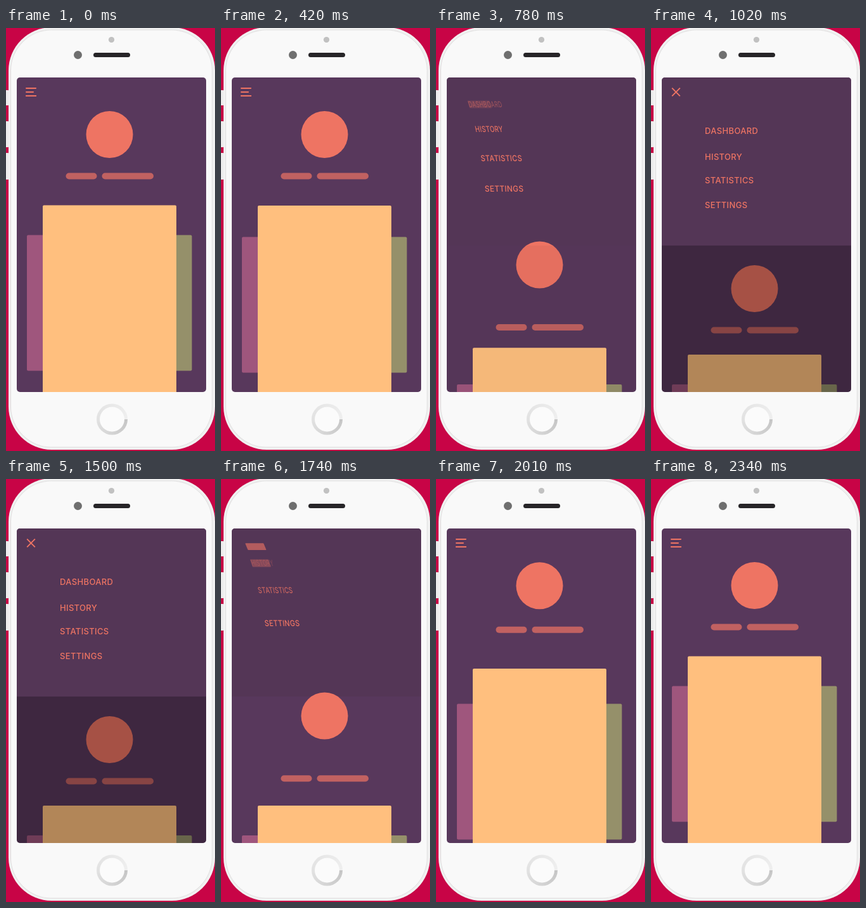
Recreate the animation shown at these times as an HTML page with a canvas. Size 330 px wide and 667 px high, loop 2370 ms.

```html
<!DOCTYPE html>
<html lang="en">
<head>
<meta charset="utf-8">
<title>Menu transition</title>
<style>
html, body { margin: 0; width: 100%; height: 100%; overflow: hidden; background: #c80446; }
canvas { display: block; width: 330px; height: 667px; }
</style>
</head>
<body>
<canvas></canvas>
<script>
const LOOP = 2370, HOLD = 420, STEP = 30;
const CORAL = '#ee7463';
const canvas = document.querySelector('canvas');
const ctx = canvas.getContext('2d');
const dpr = window.devicePixelRatio || 1;
canvas.width = 330 * dpr;
canvas.height = 667 * dpr;

const clamp = v => Math.max(0, Math.min(1, v));
const mix = (a, b, p) => a + (b - a) * p;
const ramp = (t, start, length) => clamp((t - start) / length);
const ease = t => t < .5 ? 4 * t ** 3 : 1 - 4 * (1 - t) ** 3;

// 0 = closed, 1 = open; each motion is [open start, length, close start, length]
const phase = (t, [open, openLen, close, closeLen]) =>
  ease(ramp(t, open, openLen)) - ease(ramp(t, close, closeLen));

const moves = {
  sides: [360, 412, 1780, 333],
  card: [379, 517, 1720, 400],
  pills: [440, 408, 1675, 400],
  avatar: [482, 450, 1588, 450],
  cross: [780, 200, 1500, 180],
  dim: [720, 190, 1550, 190]
};

// label, closed line y, closed line width, open text y
const items = [
  ['DASHBOARD', 95, 17, 162.5],
  ['HISTORY', 101, 13, 203],
  ['STATISTICS', 107, 17, 240.5],
  ['SETTINGS', 107, 17, 279.5]
];

function box(x, y, w, h, r, fill) {
  ctx.fillStyle = fill;
  ctx.beginPath();
  ctx.roundRect(x, y, w, h, r);
  ctx.fill();
}

function disc(x, y, r, fill) {
  ctx.fillStyle = fill;
  ctx.beginPath();
  ctx.arc(x, y, r, 0, 7);
  ctx.fill();
}

function drawPhone() {
  ctx.fillStyle = '#c80446';
  ctx.fillRect(0, 0, 330, 667);
  for (const [y, h] of [[98, 24], [147, 41], [197, 42]]) box(-3, y, 8, h, 2, '#ededed');
  box(4, -1, 326, 666, 68, '#f1f1f1');
  box(7, 2.5, 319, 659, 65, '#e0e0e0');
  box(8, 3.5, 317, 657, 64, '#f9f9f9');
  disc(166.5, 18.5, 4.6, '#c1c1c1');
  disc(113.5, 42.5, 6.5, '#6f6f6f');
  box(138, 39, 58, 7, 3.5, '#272528');

  const ring = ctx.createConicGradient(0, 167.5, 617);
  ring.addColorStop(0, '#c5c5c5');
  ring.addColorStop(.5, '#e2e2e2');
  ring.addColorStop(1, '#efefef');
  disc(167.5, 617, 24.5, ring);
  disc(167.5, 617, 19.5, '#fbfbfb');
}

function drawPanel(t) {
  const r = Math.min(500, 34 * 2 ** (Math.min(t - 660, 1860 - t) / STEP));
  if (r < 2) return;
  ctx.save();
  ctx.beginPath();
  ctx.rect(17, 78, 299, 265);
  ctx.clip();
  const p = clamp(r / 34);
  disc(mix(39, 58, p), mix(101, 115, p), r, '#543656');
  ctx.restore();
}

function drawContent(t) {
  const sideY = 326.5 + 235.5 * phase(t, moves.sides);
  box(33, sideY, 60, 214, 2, '#9f567d');
  box(233.5, sideY, 60, 214, 2, '#95906a');
  box(58, 279.5 + 235.5 * phase(t, moves.card), 211, 330, 2, '#ffbf7e');
  const pillY = 228.5 + 243 * phase(t, moves.pills);
  box(94.5, pillY, 49, 10, 5, '#c16161');
  box(151.5, pillY, 81.5, 10, 5, '#c16161');
  disc(163.5, 168 + 243 * phase(t, moves.avatar), 37, CORAL);

  ctx.globalAlpha = .3 * phase(t, moves.dim);
  ctx.fillStyle = '#000';
  ctx.fillRect(17, 343, 299, 231);
  ctx.globalAlpha = 1;
}

// A menu line swells, slants and turns into its label
function drawItem([label, lineY, lineW, textY], i, t) {
  const p = phase(t, [598 - 28 * i, 400, 1500 + 28 * i, 370]);
  ctx.save();
  ctx.translate(mix(31, 85, p), mix(lineY, textY, p));
  ctx.transform(1, 0, .5 * (1 - p) * clamp(p * 20), 1, 0, 0);
  const h = Math.min(12, 1.8 + 87 * p ** 1.3);
  ctx.globalAlpha = clamp(1 - 2.2 * p);
  box(0, -h / 2, lineW + 29 * Math.sqrt(p), h, .8, CORAL);
  ctx.globalAlpha = ramp(p, .2, .4);
  ctx.scale(.4 + .6 * p, 1);
  ctx.fillStyle = CORAL;
  ctx.fillText(label, 0, 4.7);
  ctx.restore();
}

function drawCross(t) {
  const p = phase(t, moves.cross);
  if (p <= 0) return;
  ctx.save();
  ctx.translate(39.5, 101);
  ctx.scale(p, p);
  ctx.globalAlpha = p;
  ctx.strokeStyle = CORAL;
  ctx.lineWidth = 1.9;
  ctx.beginPath();
  for (const s of [-1, 1]) {
    ctx.moveTo(-6.3, -6.3 * s);
    ctx.lineTo(6.3, 6.3 * s);
  }
  ctx.stroke();
  ctx.restore();
}

function draw(now) {
  const clock = now % LOOP;
  const t = clock < HOLD ? 0 : Math.floor(clock / STEP) * STEP;
  ctx.setTransform(dpr, 0, 0, dpr, 0, 0);
  ctx.font = '500 13px Inter, Lato, sans-serif';
  ctx.letterSpacing = '0.35px';
  drawPhone();
  ctx.save();
  ctx.beginPath();
  ctx.roundRect(17, 78, 299, 496, 5);
  ctx.clip();
  ctx.fillStyle = '#58385c';
  ctx.fillRect(17, 78, 299, 496);
  drawPanel(t);
  drawContent(t);
  items.forEach((item, i) => drawItem(item, i, t));
  drawCross(t);
  ctx.restore();
}

const start = performance.now();
function tick() {
  draw(performance.now() - start);
  requestAnimationFrame(tick);
}
tick();
</script>
</body>
</html>
```
